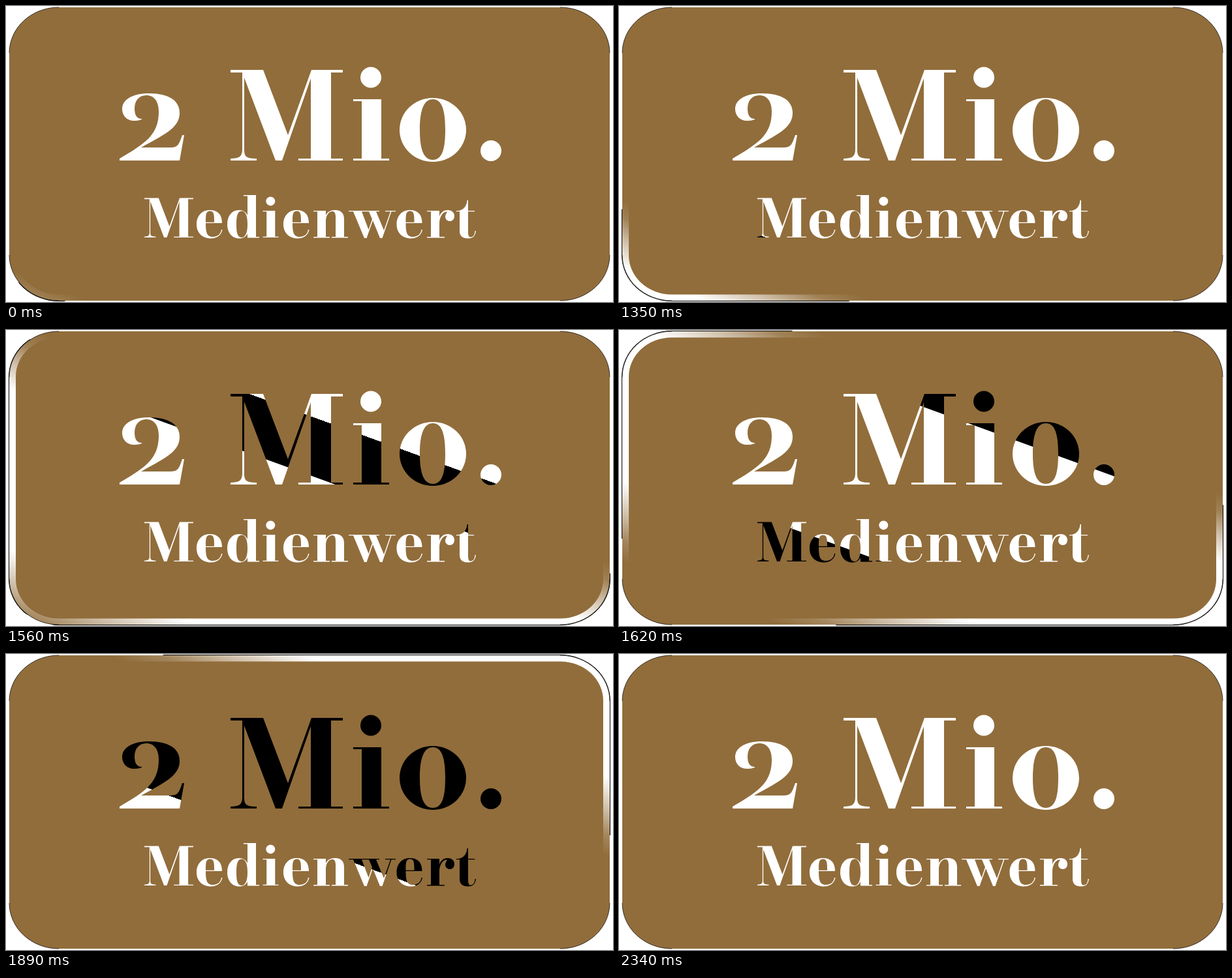
An HTML page without scripts for the animation above (3.6 s loop, 930 by 454 pixels).

```html
<!DOCTYPE html>
<html lang="de">
<head>
<meta charset="utf-8">
<title>2 Mio. Medienwert</title>
<style>
  html, body { margin: 0; width: 100%; height: 100%; overflow: hidden; background: #fff; }
  svg { display: block; width: 930px; height: 454px; }
  .card { fill: #916d3b; }
  .sweep { animation: sweep 3600ms infinite linear; }

  /* the sheen climbs from the lower left to the upper right corner */
  @keyframes sweep {
    0% { transform: translateY(400px); }
    31.94% { transform: translateY(400px); animation-timing-function: cubic-bezier(.33, .1, .7, .35); }
    40.83% { transform: translateY(143px); }
    48.33% { transform: translateY(-330px); animation-timing-function: cubic-bezier(.33, .55, .67, .85); }
    56.67% { transform: translateY(-645px); }
    65%, 100% { transform: translateY(-820px); }
  }
</style>
</head>
<body>
<svg viewBox="0 0 930 454" role="img" aria-label="2 Mio. Medienwert">
  <defs>
    <linearGradient id="sheen" x2="0" y2="1">
      <stop offset="0" stop-color="#fff" stop-opacity="0"/>
      <stop offset=".06" stop-color="#fff" stop-opacity=".14"/>
      <stop offset=".13" stop-color="#fff" stop-opacity=".55"/>
      <stop offset=".22" stop-color="#fff"/>
      <stop offset=".74" stop-color="#fff"/>
      <stop offset=".85" stop-color="#fff" stop-opacity=".55"/>
      <stop offset=".93" stop-color="#fff" stop-opacity=".18"/>
      <stop offset="1" stop-color="#fff" stop-opacity="0"/>
    </linearGradient>
    <clipPath id="edge"><rect x="4" y="1" width="922" height="452" rx="77" ry="71"/></clipPath>
    <clipPath id="face"><rect x="5" y="2" width="920" height="450" rx="76" ry="70"/></clipPath>

    <!-- letters -->
    <path id="M" d="M344 98H394L432 198L468 98H516V102H498V234H516V237H448V234H467V111L423 237H413L365 110V220C365 231 368 234 384 234V237H344V234C357 234 362 231 362 220V102H344Z"/>
    <path id="i" d="M532 143H575V234H587V237H532V234H545V146H532ZM543 109.500a16 16 0 1 1 32 0a16 16 0 1 1 -32 0Z"/>
    <path id="e" fill-rule="evenodd" d="M331 333H306C306 348 308 354 317 354C324 354 329 350 330 343H331.500C330 351 324 356.500 314 356.500C300 356.500 292 347 292 335C292 322 300 313 312 313C325 313 331 320 331 333ZM306 331.700H319C319 321 319 314.500 312.500 314.500C306 314.500 306 321 306 331.700Z"/>

    <g id="words" fill="#fff" fill-rule="evenodd">
      <path d="M174 237V234C213 211 234 198 234 162C234 145 226 137 215 137C203 137 197 146 197 157C197 167 200 173 208 173V174C206 175 201 176 196 176C185 176 178 168 178 158C178 144 193 134 219 134C249 134 266 145 266 164C266 187 243 197 207 217H252C263 217 265 213 270 198H273L266 237Z"/>
      <use href="#M"/>
      <use href="#i"/>
      <path d="M603 190A51 49 0 1 1 705 190A51 49 0 1 1 603 190ZM634 190C634 220 640 236 654 236C668 236 673 220 673 190C673 160 668 143 654 143C640 143 634 160 634 190Z"/>
      <circle cx="743" cy="222" r="16"/>

      <use href="#M" transform="translate(62 251.700) scale(.436)"/>
      <use href="#e"/>
      <path d="M364 290H383V354H388V355.500H370V349C368 354 363 356.500 357 356.500C346 356.500 339 347 339 335C339 322 346 313 357 313C363 313 368 316 370 321V291.500H364ZM370 335C370 322 367 314.500 361 314.500C354 314.500 353 324 353 335C353 346 354 355 361 355C367 355 370 347 370 335Z"/>
      <use href="#i" transform="translate(161.600 251.700) scale(.436)"/>
      <use href="#e" x="133"/>
      <path d="M471 314H490V321C492 316 497 313 504 313C513 313 518 318 518 327V354H524V355.500H499V354H505V324C505 317 503 315 500 315C494 315 490 322 490 330V354H496V355.500H471V354H477V315.300H471Z"/>
      <path d="M525 314H572V315.300H567L579 344L589 315.300H581V314H597V315.300H590.500L576.500 356H573L562 329L552.500 356H549L532 315.300H525ZM545 315.300L555.500 343L561 327L556 315.300Z"/>
      <use href="#e" x="306.500"/>
      <path d="M645 314H664V323C666 316 671 313 677 313C683 313 687 317 687 322C687 327 684 330 680 330C676 330 673 327 673 323C673 320 675 318 676 315.500C669 315 664 324 664 333V354H672V355.500H645V354H651V315.300H645Z"/>
      <path d="M706.500 298H708V314H718V315.300H708V346C708 352 709 354.500 712 354.500C716 354.500 718 351 718.500 345H720C719 352 716 356.500 708 356.500C699 356.500 695 352 695 345V315.300H690V314H694C702 312 706 306 706.500 298Z"/>
    </g>
    <mask id="type" maskUnits="userSpaceOnUse" x="0" y="0" width="930" height="454"><use href="#words"/></mask>
  </defs>

  <!-- dark hairline around the lit part of the rim -->
  <g clip-path="url(#edge)">
    <g class="sweep"><rect y="16" width="930" height="424" transform="skewY(22)"/></g>
  </g>

  <rect class="card" x="5" y="2" width="920" height="450" rx="76" ry="70"/>
  <g clip-path="url(#face)">
    <g class="sweep"><rect width="930" height="475" fill="url(#sheen)" transform="skewY(22)"/></g>
  </g>
  <rect class="card" x="15" y="11.500" width="900" height="431" rx="66" ry="60"/>
  <path d="M5 72A76 70 0 0 1 81 2M849 2A76 70 0 0 1 925 72M925 382A76 70 0 0 1 849 452M81 452A76 70 0 0 1 5 382" fill="none" stroke="#000" stroke-opacity=".7"/>

  <!-- lettering: white, crossed by two black bands -->
  <g mask="url(#type)">
    <rect width="930" height="454" fill="#fff"/>
    <g class="sweep">
      <g transform="skewY(20)">
        <rect y="-21" width="930" height="91"/>
        <rect y="330" width="930" height="332"/>
      </g>
    </g>
  </g>
</svg>
</body>
</html>
```
